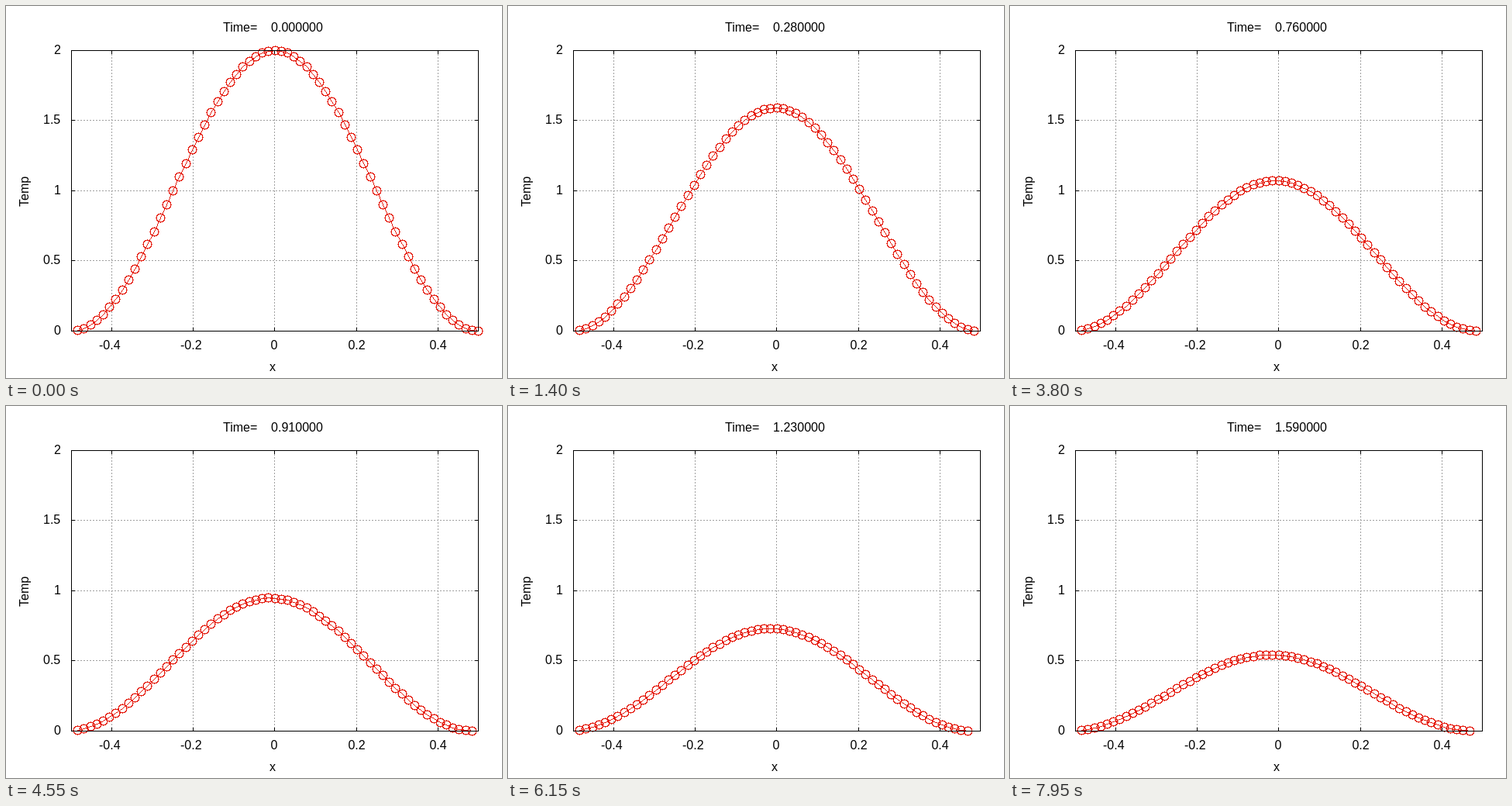
These frames come from a looping animation (640x480 px, 8 s). An HTML page with a canvas:

```html
<!DOCTYPE html>
<html lang="en">
<head>
<meta charset="utf-8">
<title>Temperature profile</title>
<style>
  html, body { margin: 0; width: 100%; height: 100%; overflow: hidden; background: #fff; }
  canvas { display: block; }
</style>
</head>
<body>
<canvas id="plot" width="640" height="480"></canvas>
<script>
const ctx = document.getElementById('plot').getContext('2d', { alpha: false });

const LEFT = 84, RIGHT = 609, TOP = 57, BOTTOM = 419;
const CELLS = 64, STEP_MS = 50, STEPS = 160, STEPS_PER_UNIT = 100;
const DECAY = 0.82, DRIFT = 0.0118, FRONT_SPEED = 0.0166;
const RED = '#e51e10', GREY = '#a0a0a0';
const TEXT_CENTER = 344, BASELINE_SHIFT = 5;
const X_TICKS = [[136, '-0.4'], [241, '-0.2'], [346, ' 0'], [452, ' 0.2'], [557, ' 0.4']];
const Y_TICKS = [[57, '2'], [147, '1.5'], [238, '1'], [328, '0.5'], [419, '0']];

const toX = x => Math.floor(LEFT + (x + 0.5) * (RIGHT - LEFT) + 0.5);
const toY = u => BOTTOM - Math.floor(u * (BOTTOM - TOP) / 2 + 0.5);
const dot = (x, y) => ctx.fillRect(x, y, 1, 1);

// Truncating the coordinates gives the marker its small nubs on the axes.
const ring = new Map();
for (let deg = 0; deg < 360; deg++) {
  const angle = deg * Math.PI / 180;
  const offset = [Math.cos(angle), Math.sin(angle)].map(v => Math.trunc(6 * v + 1e-9 * Math.sign(v)));
  ring.set(offset.join(), offset);
}

function segment([x0, y0], [x1, y1]) {
  const n = Math.max(Math.abs(x1 - x0), Math.abs(y1 - y0));
  for (let i = 0; i <= n; i++) {
    dot(Math.round(x0 + (x1 - x0) * i / n), Math.round(y0 + (y1 - y0) * i / n));
  }
}

function stroke(x0, y0, x1, y1) {
  ctx.beginPath();
  ctx.moveTo(x0, y0);
  ctx.lineTo(x1, y1);
  ctx.stroke();
}

// Text starts on a whole pixel; align is 0.5 for centred, 1 for right-aligned.
function label(text, x, y, align) {
  const start = Math.round(x - align * ctx.measureText(text).width);
  ctx.fillText(text, start, y + BASELINE_SHIFT);
}

function drawGrid() {
  ctx.strokeStyle = GREY;
  ctx.lineWidth = 1;
  ctx.setLineDash([2, 2]);
  for (const [x] of X_TICKS) stroke(x + 0.5, BOTTOM + 1, x + 0.5, TOP);
  for (const [y] of Y_TICKS) stroke(LEFT, y + 0.5, RIGHT, y + 0.5);
  ctx.setLineDash([]);
}

function drawCurve(time) {
  const points = [];
  for (let i = 1; i <= CELLS; i++) {
    const x = i / CELLS - 0.5;
    if (x > 0.5 - FRONT_SPEED * time) break;
    const u = Math.exp(-DECAY * time) * (1 + Math.cos(2 * Math.PI * (x + DRIFT * time)));
    points.push([toX(x), toY(u)]);
  }
  ctx.fillStyle = RED;
  points.forEach((p, i) => {
    if (i) segment(points[i - 1], p);
    for (const [dx, dy] of ring.values()) dot(p[0] + dx, p[1] + dy);
  });
}

function drawAxes() {
  ctx.strokeStyle = ctx.fillStyle = '#000';
  ctx.strokeRect(LEFT + 0.5, TOP + 0.5, RIGHT - LEFT, BOTTOM - TOP);
  ctx.font = '16px "Liberation Sans", Arial, sans-serif';
  for (const [x, text] of X_TICKS) {
    ctx.fillRect(x, TOP, 1, 5);
    ctx.fillRect(x, BOTTOM - 4, 1, 5);
    label(text, x - 2, 438, 0.5);
  }
  for (const [y, text] of Y_TICKS) {
    ctx.fillRect(LEFT, y, 5, 1);
    ctx.fillRect(RIGHT - 4, y, 5, 1);
    label(text, 70.5, y, 1);
  }
  label('x', TEXT_CENTER, 466, 0.5);
  ctx.save();
  ctx.translate(24, 259);
  ctx.rotate(-Math.PI / 2);
  label('Temp', 0, 0, 0);
  ctx.restore();
}

function frame() {
  const time = Math.floor(performance.now() / STEP_MS) % STEPS / STEPS_PER_UNIT;
  ctx.fillStyle = '#fff';
  ctx.fillRect(0, 0, 640, 480);
  drawGrid();
  drawCurve(time);
  drawAxes();
  label('Time=    ' + time.toFixed(6), TEXT_CENTER, 28, 0.5);
  requestAnimationFrame(frame);
}
frame();
</script>
</body>
</html>
```
